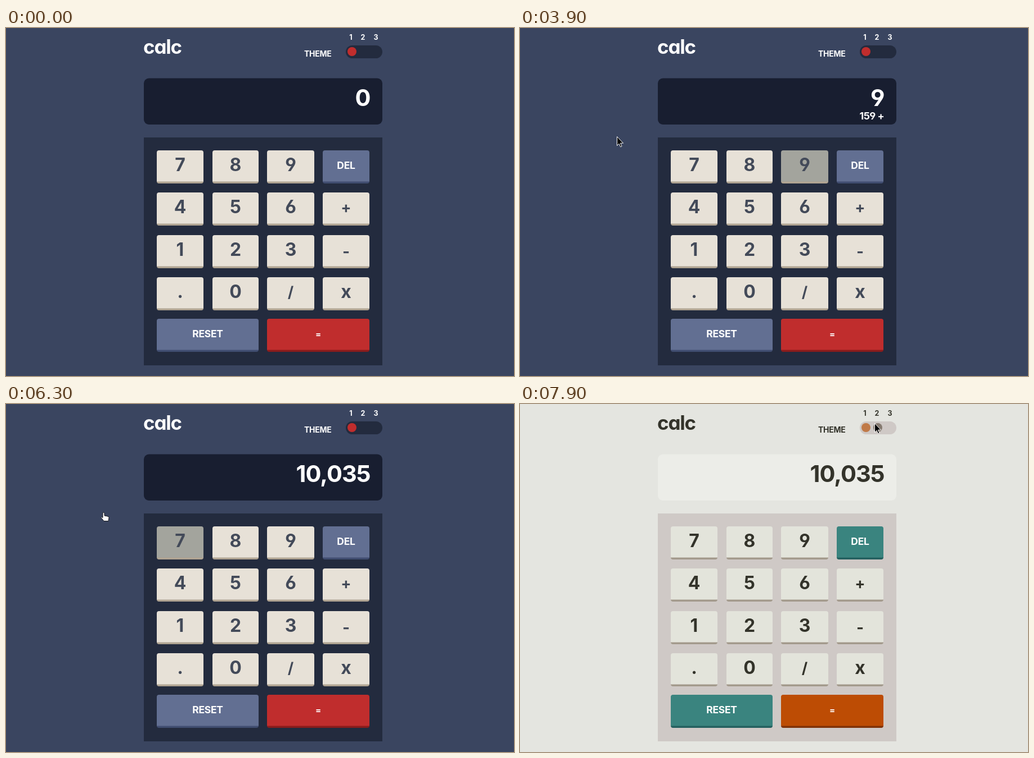
Recreate the animation shown at these times as an HTML page. Size 903x620 px, loop 8000 ms.

```html
<!DOCTYPE html>
<html lang="en">
<head>
<meta charset="utf-8">
<title>calc</title>
<style>
  html, body { margin: 0; width: 100%; height: 100%; overflow: hidden; }
  svg { display: block; width: 903px; height: 620px; }
  .dark {
    --bg: #3a4560; --panel: #232b3e; --screen: #181e30; --ink: #fff;
    --key: #e7e1d7; --key-edge: #b0a492; --key-ink: #434a59;
    --alt: #626f92; --alt-edge: #404d70;
    --go: #c02d2d; --go-edge: #8a1c1c; --dot: #c02d2d;
  }
  .light {
    --bg: #e4e5e0; --panel: #cfc9c6; --screen: #ecede8; --ink: #33332a;
    --key: #e3e4db; --key-edge: #a39a8c; --key-ink: #33332a;
    --alt: #3a847f; --alt-edge: #24605f;
    --go: #bd4c04; --go-edge: #803208; --dot: #bd4c04;
  }
  .bg { fill: var(--bg); }
  .panel { fill: var(--panel); }
  .screen { fill: var(--screen); }
  .dot { fill: var(--dot); }
  .blend .dot { fill: #c07a48; }
  .next { fill: #857a70; visibility: hidden; }
  .blend .next { visibility: visible; }

  text {
    font-family: Inter, "Open Sans", sans-serif; font-weight: 700;
    font-feature-settings: "cv03", "cv04", "cv11"; fill: var(--ink);
  }
  .logo { font-size: 35px; letter-spacing: -1.2px; }
  .label { font-size: 14px; letter-spacing: -.3px; }
  .mark { font-size: 12.5px; text-anchor: middle; }
  .value { font-size: 41.5px; letter-spacing: -1px; text-anchor: end; }
  .history { font-size: 18px; letter-spacing: -.6px; text-anchor: end; }

  .key text { text-anchor: middle; }
  .num .face { fill: var(--key); }
  .num .edge { fill: var(--key-edge); }
  .num text { fill: var(--key-ink); }
  .alt .face { fill: var(--alt); }
  .alt .edge { fill: var(--alt-edge); }
  .go .face { fill: var(--go); }
  .go .edge { fill: var(--go-edge); }
  .alt text, .go text { fill: #fff; letter-spacing: -.3px; }
  .key.lit .face { fill: #a3a49d; }

  .arrow path { fill: #000; stroke: #fff; }
  .hand path { fill: #fff; stroke: #15151a; }
</style>
</head>
<body>
<svg id="stage" class="dark" viewBox="0 0 903 620">
  <rect class="bg" width="903" height="620"/>
  <text class="logo" x="244" y="46">calc</text>
  <text class="label" x="530" y="51">THEME</text>
  <text class="mark" x="613" y="21">1</text>
  <text class="mark" x="634.5" y="21">2</text>
  <text class="mark" x="657.5" y="21">3</text>
  <rect class="panel" x="604" y="31" width="65" height="23" rx="11.5"/>
  <circle class="dot" cx="615" cy="42" r="8"/>
  <circle class="next" cx="636" cy="42" r="8"/>
  <rect class="screen" x="245" y="89.5" width="424" height="82.5" rx="9"/>
  <text class="value" id="value" x="647.5" y="139"></text>
  <text class="history" id="history" x="647" y="163"></text>
  <rect class="panel" x="245" y="195" width="424" height="406"/>
  <g id="keys"></g>
  <g id="cursor">
    <path/>
  </g>
</svg>
<script>
const $ = id => document.getElementById(id);
const LOOP = 8000;
const cols = [[268, 351], [367, 449], [464, 548], [563, 646]];
const rows = [218, 293, 369, 444, 518];
const keys = {};

// Font size and baseline offset from the key's top for labels that are not digits.
const special = {
  '+': [27, 36], '-': [28, 38.5], '/': [27, 36], '=': [15, 32.5],
  DEL: [17.5, 33], RESET: [17.5, 33]
};

function addKey(label, row, from, to = from, kind = 'num') {
  const x = cols[from][0], y = rows[row], w = cols[to][1] - x;
  const [size, base] = special[label] || [32, 37];
  $('keys').insertAdjacentHTML('beforeend', `
    <g class="key ${kind}">
      <rect class="edge" x="${x}" y="${y + 40}" width="${w}" height="19" rx="4"/>
      <path class="face" d="M${x} ${y + 4}q0-4 4-4h${w - 8}q4 0 4 4v51.5h${-w}z"/>
      <text x="${x + w / 2}" y="${y + base}" font-size="${size}">${label}</text>
    </g>`);
  keys[label] = $('keys').lastElementChild;
}

['789', '456+', '123-', '.0/x'].forEach((line, row) =>
  [...line].forEach((label, col) => addKey(label, row, col)));
addKey('DEL', 0, 3, 3, 'alt');
addKey('RESET', 4, 0, 1, 'alt');
addKey('=', 4, 2, 3, 'go');

const shapes = {
  arrow: 'M.5.5V16.5L4 13.2L6.6 18.8L9 17.7L6.5 12.2H11.5Z',
  hand: 'M3.5 1.5q1.5-1.5 3 0v5l6 1.2q2 .5 2 2.3l-1 6h-8l-5-6q.5-2 3 0z'
};

// Each step changes part of the state from its time on.
const steps = [
  [0, { value: '0', history: '', lit: '', at: null, shape: 'arrow', theme: 'dark' }],
  [500, { at: [461, 130] }],
  [600, { at: [470, 150] }],
  [1600, { at: [172, 193] }],
  [2200, { value: '1' }],
  [2300, { value: '15', lit: '5' }],
  [2800, { value: '159', lit: '9' }],
  [2900, { lit: '' }],
  [3400, { value: '0', history: '159 +', lit: '+' }],
  [3500, { lit: '' }],
  [3900, { value: '9', lit: '9' }],
  [4000, { lit: '' }],
  [4300, { value: '98', lit: '8' }],
  [4400, { lit: '' }],
  [4600, { value: '987', lit: '7' }],
  [4800, { value: '9,876', lit: '6' }],
  [4900, { lit: '' }],
  [5500, { value: '10,035', history: '' }],
  [6300, { lit: '7', shape: 'hand', at: [168.5, 192.5] }],
  [6400, { lit: '5', at: [322, 262] }],
  [6500, { lit: '6', at: [470, 285] }],
  [6600, { lit: '', shape: 'arrow', at: [597, 123] }],
  [6800, { at: [602, 131] }],
  [7000, { at: [632, 59] }],
  [7200, { at: [631, 60] }],
  [7500, { at: [632, 46] }],
  [7600, { at: [630, 34] }],
  [7800, { theme: 'light' }],
  [7900, { theme: 'light blend' }]
];

function draw(t) {
  const s = Object.assign({}, ...steps.filter(([from]) => from <= t).map(step => step[1]));
  $('stage').setAttribute('class', s.theme);
  $('value').textContent = s.value;
  $('history').textContent = s.history;
  for (const label in keys) keys[label].classList.toggle('lit', label === s.lit);
  const cursor = $('cursor');
  cursor.setAttribute('visibility', s.at ? 'visible' : 'hidden');
  if (s.at) {
    cursor.setAttribute('class', s.shape);
    cursor.setAttribute('transform', `translate(${s.at})`);
    cursor.firstElementChild.setAttribute('d', shapes[s.shape]);
  }
}

const start = performance.now();
function tick() {
  draw((performance.now() - start) % LOOP);
  requestAnimationFrame(tick);
}
tick();
</script>
</body>
</html>
```
